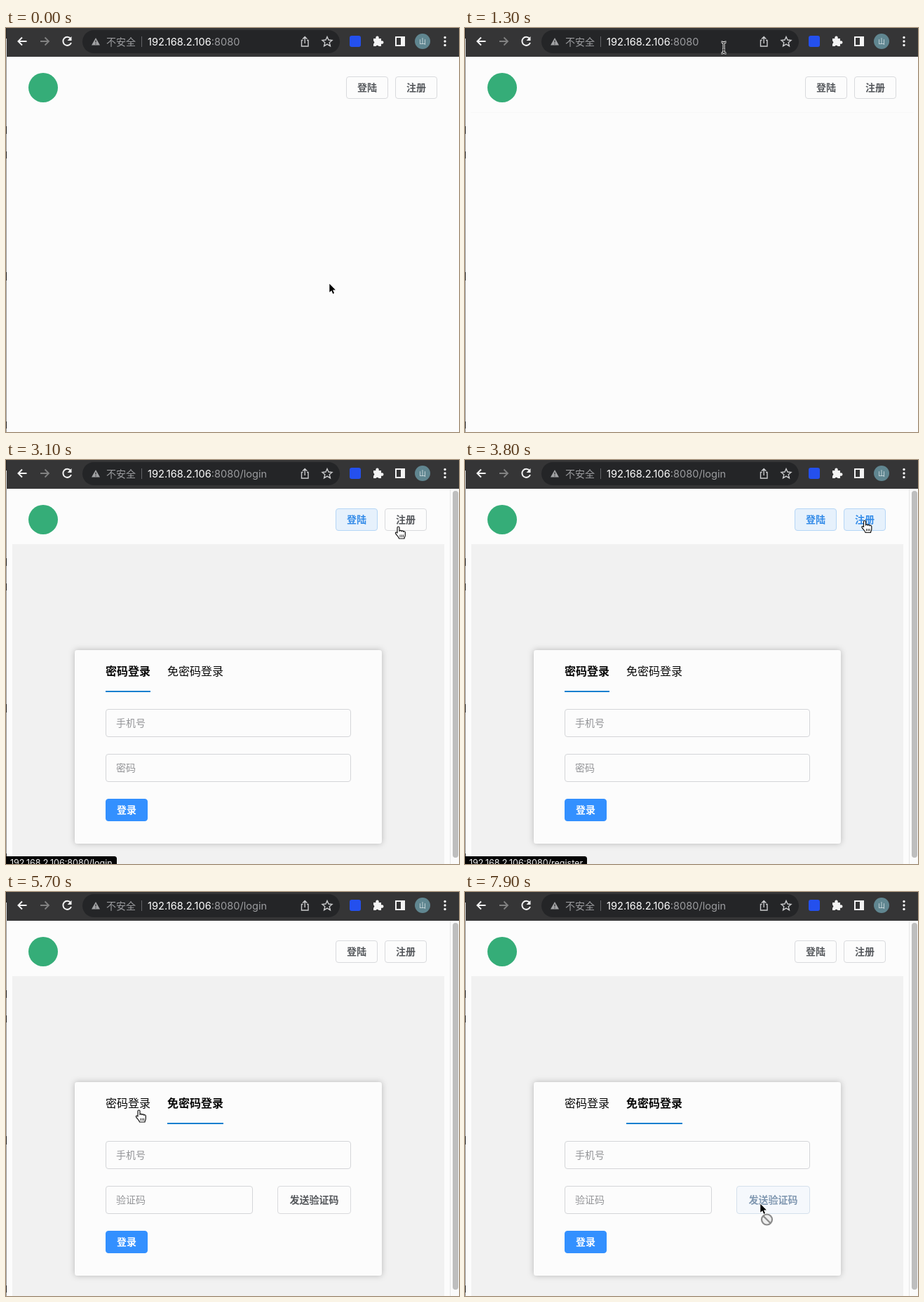
An HTML page that plays this animation: 646x576 px, repeating every 8000 ms.

```html
<!DOCTYPE html>
<html lang="zh-CN">
<head>
<meta charset="utf-8">
<title>登录演示</title>
<style>
html, body { margin: 0; width: 100%; height: 100%; overflow: hidden; background: #fcfcfc; }
svg { display: block; width: 646px; height: 576px; }
text { font: 14px Inter, "Noto Sans CJK SC", "Noto Sans CJK", sans-serif; white-space: pre; }
.icon { fill: none; stroke: #c9cacc; stroke-width: 1.4; }
.white { stroke: #f4f4f4; stroke-width: 2; }
</style>
</head>
<body>
<svg viewBox="0 0 646 576">
  <defs>
    <filter id="shadow" x="-10%" y="-10%" width="120%" height="120%">
      <feDropShadow dx="0" dy="0" stdDeviation="4" flood-opacity=".25"/>
    </filter>
    <path id="arrow" d="M.3.8V12.8L3.2 10.2 5.2 14.9 7 14.1 5 9.500H8.9Z" stroke="#fff" stroke-width="1.6" paint-order="stroke"/>
    <g id="hand" fill="#fff" stroke="#111" stroke-width="1.2" stroke-linejoin="round">
      <path d="M-2 9V1.5C-2-.5 1-.5 1 1.5V6.5C1 5 3.7 5 3.9 6.7 4 5.6 6.6 5.6 6.7 7.3 7 6.3 9.3 6.5 9.3 8.3V12C9.3 14.5 8 15 8 17H.5C0 14-3.5 12-4.5 9.5-5 8-3 7.3-2 9Z"/>
      <path d="M2 11.5V15M4.3 11.5V15M6.5 11.5V15" stroke-width=".9"/>
    </g>
    <path id="stem" d="M-3.5-8Q0-8 0-5.5Q0-8 3.5-8M0-5.5V5.5M-3.5 8Q0 8 0 5.5Q0 8 3.5 8M-2 3H2"/>
    <g id="beam" fill="none">
      <use href="#stem" stroke="#fff" stroke-width="3"/>
      <use href="#stem" stroke="#111" stroke-width="1.2"/>
    </g>
    <g id="blocked">
      <use href="#arrow"/>
      <circle cx="9.5" cy="23" r="9" fill="#fff"/>
      <g fill="#eee" stroke="#8b8b8b" stroke-width="2.2"><circle cx="9.5" cy="23" r="7.5"/><path d="M4.5 18L14.5 28"/></g>
    </g>
  </defs>

  <rect width="646" height="576" fill="#fcfcfc"/>
  <g id="page"></g>
  <circle cx="53" cy="85" r="21" fill="#35ad78"/>

  <!-- toolbar -->
  <rect width="646" height="41" fill="#353536"/>
  <g id="address"></g>
  <g class="icon">
    <path class="white" d="M29.5 19H18M23 13.5L17.5 19 23 24.5"/>
    <path d="M49 19H60.5M55.5 13.5L61 19 55.5 24.5" stroke="#818181" stroke-width="1.8"/>
    <path class="white" d="M92 15A6 6 0 1 0 93 21"/>
    <path d="M93.5 12V18H87.5Z" fill="#f4f4f4" stroke="none"/>
    <path d="M423.5 17.5H421.5V26H431V17.5H429M426.2 22V13M423 15.8L426.2 12.6 429.4 15.8"/>
    <path d="M458 12.5L460 17 465 17.5 461.2 20.8 462.4 25.7 458 23.1 453.6 25.7 454.8 20.8 451 17.5 456 17Z"/>
    <rect x="556" y="13" width="12" height="12" class="white"/>
  </g>
  <path d="M128 14L134 24.5H122Z" fill="#a2a3a5"/>
  <path d="M128 17.5V20.8M128 22V23.3" stroke="#28292b" stroke-width="1.2"/>
  <text x="143" y="24.5" fill="#9b9c9f">不安全</text>
  <path d="M193.5 12V27" stroke="#636467"/>
  <rect x="490" y="11" width="16" height="16" rx="3" fill="#2450ee"/>
  <path d="M524 15H527.5A2.3 2.3 0 1 1 531.5 15H535V18.5A2.3 2.3 0 1 1 535 22.5V26H531.5A2.2 2.2 0 0 0 527.5 26H524V22.5A2.2 2.2 0 0 0 524 18.5Z" fill="#f4f4f4"/>
  <path d="M563 13H568V25H563Z" fill="#f4f4f4"/>
  <circle cx="594" cy="19" r="11" fill="#608690"/>
  <text x="594" y="23" text-anchor="middle" fill="#d8e3e6" style="font-size:10px">山</text>
  <g fill="#f4f4f4"><circle cx="626" cy="13.5" r="1.7"/><circle cx="626" cy="19" r="1.7"/><circle cx="626" cy="24.5" r="1.7"/></g>

  <!-- window edge -->
  <path d="M.5 0V15" stroke="#222"/>
  <path d="M.5 15V41" stroke="#ddd"/>
  <path d="M.5 41V576" stroke="#999"/>
  <path d="M.5 140v11M.5 176v10M.5 348v12M.5 561v10" stroke="#222"/>

  <g id="overlay"></g>
</svg>
<script>
const LOOP = 8000, TICK = 100;
const HOST = '192.168.2.106', PORT = ':8080';
const LOGIN_AT = 2800;
const TAB_CLICKS = [5200, 6000, 6800];

// time, x, y, pointer shape from then on
const PATH = [
  [0, 461, 364, 'arrow'], [500, 372, 27, 'beam'], [700, 369, 28, 'beam'],
  [1300, 369, 28, 'beam'], [1500, 440, 60, 'arrow'], [1700, 485, 88, 'hand'],
  [1900, 490, 104, 'arrow'], [2100, 497, 106, 'arrow'], [2400, 508, 92, 'hand'],
  [2800, 508, 90, 'hand'], [3100, 560, 95, 'hand'], [3400, 572, 88, 'hand'],
  [4000, 570, 86, 'hand'], [4400, 535, 90, 'hand'], [4600, 480, 125, 'arrow'],
  [5000, 282, 304, 'hand'], [5300, 270, 308, 'hand'], [5700, 190, 311, 'hand'],
  [6200, 180, 308, 'hand'], [6600, 265, 306, 'hand'], [6900, 270, 308, 'hand'],
  [7200, 310, 335, 'arrow'], [7300, 332, 362, 'beam'], [7400, 365, 397, 'arrow'],
  [7600, 412, 430, 'blocked'], [7900, 421, 444, 'blocked']
];

const $ = id => document.getElementById(id);
const between = (t, a, b) => t >= a && t < b;
const mix = (a, b, p) => a + (b - a) * p;
const ease = p => p * p * (3 - 2 * p);

const box = (x, y, w, h, fill, stroke = 'none', r = 3.5) =>
  `<rect x="${x}" y="${y}" width="${w}" height="${h}" rx="${r}" fill="${fill}" stroke="${stroke}"/>`;
const label = (s, x, y, fill, css = '', anchor = 'start') =>
  `<text x="${x}" y="${y}" fill="${fill}" text-anchor="${anchor}" style="${css}">${s}</text>`;
const button = (s, x, y, w, h, [fill, stroke, color]) =>
  box(x + .5, y + .5, w - 1, h - 1, fill, stroke) +
  label(s, x + w / 2, y + h / 2 + 5, color, 'font-weight:600', 'middle');
const field = (s, y, w) =>
  box(142.5, y + .5, w - 1, 39, '#fcfcfc', '#d4d5d8') + label(s, 157, y + 25, '#949598');

// button looks: fill, border, text
const PLAIN = ['#fcfcfc', '#d9dadd', '#55585c'];
const LIT = ['#e6f1fc', '#b5d6f6', '#338be8'];
const DISABLED = ['#f5f8fc', '#d5e0ec', '#8198b1'];
const PRIMARY = ['#3390ff', '#3390ff', '#fff'];

function pointer(t) {
  const i = PATH.findLastIndex(k => k[0] <= t);
  const a = PATH[i], b = PATH[i + 1] || a;
  const p = b === a ? 0 : ease((t - a[0]) / (b[0] - a[0]));
  return `<use href="#${a[3]}" x="${mix(a[1], b[1], p)}" y="${mix(a[2], b[2], p)}"/>`;
}

function card(t) {
  const clicks = TAB_CLICKS.filter(c => c <= t);
  const byCode = clicks.length % 2 === 1;
  const slide = clicks.length ? ease(Math.min(1, (t - clicks.at(-1)) / 300)) : 1;
  const pos = byCode ? slide : 1 - slide;
  const tab = (s, x, on) => label(s, x, 307, '#080808', `font-size:16px;font-weight:${on ? 700 : 400}`);
  return `<g filter="url(#shadow)">${box(98, 271, 438, 276, '#fcfcfc', 'none', 4)}</g>` +
    tab('密码登录', 142, !byCode) + tab('免密码登录', 230, byCode) +
    box(mix(142, 230, pos), 329, mix(64, 80, pos), 2, '#1680cf', 'none', 0) +
    field('手机号', 355, 350) +
    (byCode
      ? field('验证码', 419, 210) + button('发送验证码', 387, 419, 105, 40, t >= 7600 ? DISABLED : PLAIN)
      : field('密码', 419, 350)) +
    button('登录', 142, 483, 60, 32, PRIMARY);
}

function page(t) {
  const onLogin = t >= LOGIN_AT;
  const x = onLogin ? 470 : 485;
  const loginLit = between(t, 1700, 1900) || between(t, 2400, 5200);
  const registerLit = between(t, 3200, 4500);
  const nav = button('登陆', x, 69, 60, 32, loginLit ? LIT : PLAIN) +
    button('注册', x + 70, 69, 60, 32, registerLit ? LIT : PLAIN);
  if (!onLogin) {
    const line = t < 500 ? 0 : t < 1900 ? .3 : 1;
    return nav + `<path d="M8 120.5H640" stroke="#f0f0f0" opacity="${line}"/>`;
  }
  return nav + box(9, 120, 616, 456, '#f1f1f1', 'none', 0) + card(t) +
    box(633, 41, 13, 535, '#fafafa', 'none', 0) +
    '<path d="M633.5 41V576" stroke="#e6e6e6"/>' +
    box(637, 44, 8, 523, '#bebebe', 'none', 4);
}

function address(t) {
  const css = 'font-size:14.6px';
  if (between(t, 500, 1300)) {
    return `<g stroke-width="2">${box(109, 3, 367, 33, '#191a1d', '#5b94e6', 16.5)}</g>` +
      box(202, 10, 134, 18, '#a9cdf7', 'none', 0) +
      label(HOST + PORT, 202, 24.5, '#25344a', css);
  }
  const path = t >= LOGIN_AT ? '/login' : '';
  return box(109, 3, 367, 33, '#242527', 'none', 16.5) +
    label(`${HOST}<tspan fill="#9b9c9f">${PORT + path}</tspan>`, 202, 24.5, '#fff', css);
}

function status(t) {
  const link = between(t, 2500, 3300) ? '/login' : between(t, 3300, 4800) ? '/register' : '';
  if (!link) return '';
  return box(-5, 565, link === '/login' ? 163 : 179, 20, '#050505') +
    label(HOST + PORT + link, 6, 579, '#f0f0f0', 'font-size:12.5px');
}

let last = -1;
function draw(now) {
  const t = Math.floor(now % LOOP / TICK) * TICK;
  if (t !== last) {
    last = t;
    $('page').innerHTML = page(t);
    $('address').innerHTML = address(t);
    $('overlay').innerHTML = status(t) + pointer(t);
  }
  requestAnimationFrame(draw);
}
draw(0);
</script>
</body>
</html>
```
